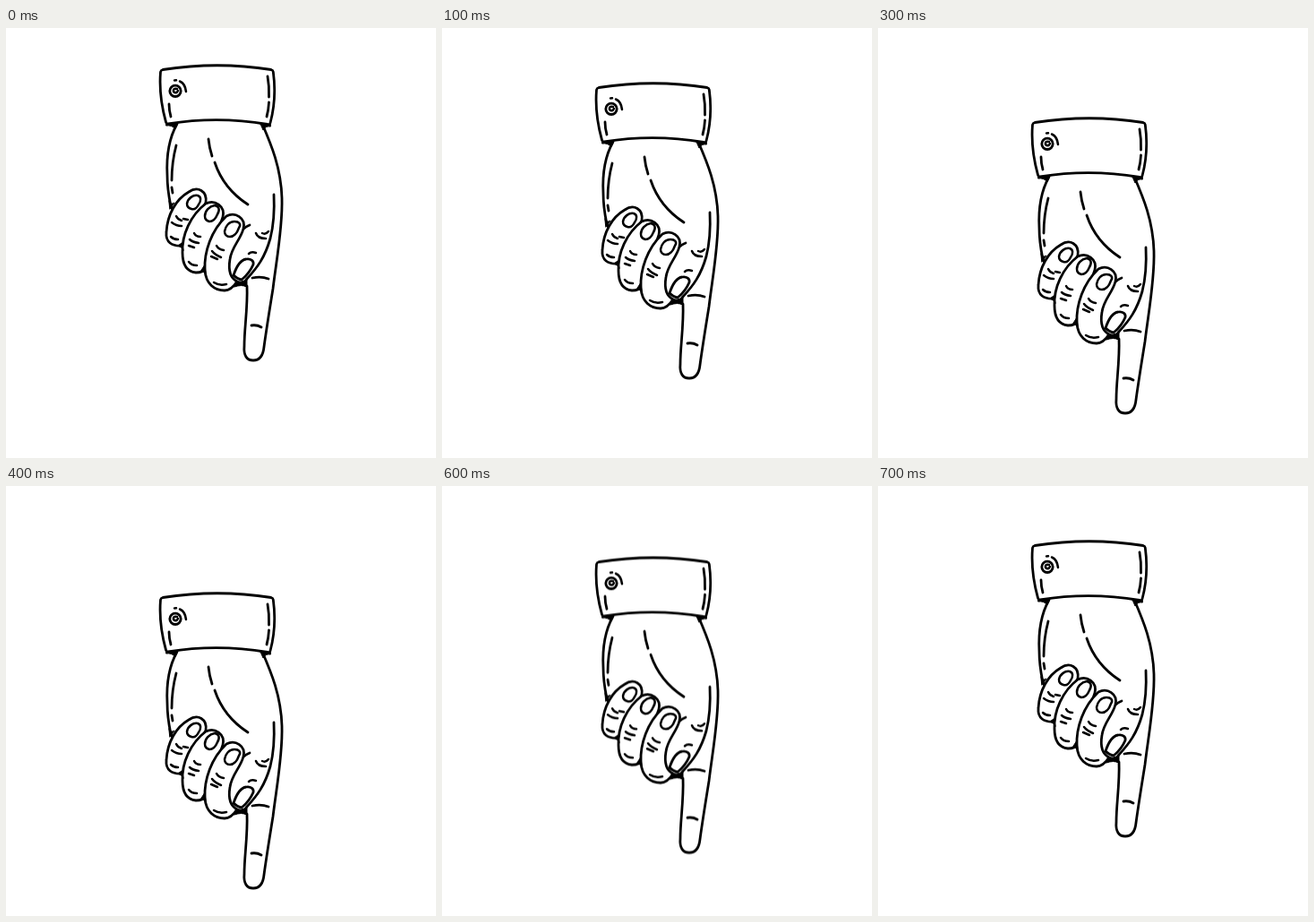
Recreate the animation shown at these times as an HTML page. Size 480 by 480 pixels, loop 0.8 s.

```html
<!DOCTYPE html>
<html lang="en">
<head>
<meta charset="utf-8">
<title>Pointing hand</title>
<style>
  html, body { margin: 0; width: 100%; height: 100%; overflow: hidden; background: #fff; }
  svg { display: block; width: 100vw; height: 100vh; }
  .hand {
    fill: none; stroke: #000; stroke-width: 2.8;
    stroke-linecap: round; stroke-linejoin: round;
    animation: bob 800ms step-end infinite;
  }
  .skin { fill: #fff; }
  .ink { fill: #000; stroke-width: 1; }
  .fine { stroke-width: 2.5; }
  @keyframes bob {
    0%, 100% { transform: translateY(0); }
    12.5%, 87.5% { transform: translateY(20px); }
    25%, 75% { transform: translateY(38.3px); }
    37.5%, 62.5% { transform: translateY(59px); }
    50% { transform: translateY(78px); }
  }
</style>
</head>
<body>
<svg viewBox="0 0 480 480">
  <g class="hand">
    <!-- palm and index finger -->
    <path class="skin" d="M191 107C182 123 179 145 180 164C180 180 182 189 184 199L222 270L269 288C270 312 266 335 266 355C265 366 269 371 276 371C283 371 287 366 288 356C291 334 295 310 298 291C302 258 309 222 308 190C307 156 296 130 286 107"/>
    <path d="M299 186C300 206 298 223 295 235C289 256 281 267 268 281"/>
    <path d="M226 124Q227 134 230 143M233 150C240 171 253 186 270 197"/>
    <path d="M190 131Q185 150 185 170M185 178L186 184"/>
    <path d="M275 279Q285 277 293 280M274 332Q280 331 285 334"/>

    <!-- thumb -->
    <path d="M259 232Q264 223 272 220"/>
    <path class="fine" d="M279 229Q281 235 290 235M286 229Q290 231 293 227M271 252Q274 249 279 251"/>
    <path class="skin" d="M254 276C257 267 261 259 268 258C273 257 277 260 276 264C273 271 268 277 263 281Q258 280 254 276Z"/>

    <!-- folded fingers -->
    <path class="skin" d="M223 195C225 182 214 176 204 183C190 191 180 208 179 228C178 239 185 244 197 243Z"/>
    <path class="skin" d="M242 211C245 199 233 191 223 196C206 209 196 231 197 251C197 265 203 272 212 273C218 273 221 272 223 268Z"/>
    <path class="skin" d="M265 224C268 212 256 205 246 210C229 226 221 250 222 270C223 286 233 293 244 293C250 293 254 289 258 283C250 279 248 270 250 258C252 244 262 236 265 224Z"/>

    <!-- nails -->
    <g class="fine">
      <path d="M202 196C203 190 209 186 214 187C218 188 218 193 215 197C213 201 210 203 207 202C203 201 202 199 202 196Z"/>
      <path d="M222 210C222 204 227 199 233 198C238 199 239 203 236 208C234 213 231 216 227 216C223 215 222 213 222 210Z"/>
      <path d="M244 227C245 221 249 216 255 216C260 216 263 219 260 223C258 229 254 233 250 233C246 233 244 230 244 227Z"/>
    </g>

    <!-- knuckle creases -->
    <g class="fine">
      <path d="M190 210Q192 214 196 215M198 213L203 214M185 217Q190 221 196 221M184 233Q187 236 192 236"/>
      <path d="M210 229Q212 233 217 233M205 236Q208 239 215 240M204 243L210 245M204 261Q207 265 213 265"/>
      <path d="M235 243Q237 247 243 248M230 249Q233 253 240 256M229 255L236 258M232 284Q238 288 246 286"/>
    </g>

    <!-- dark corners -->
    <path class="ink" d="M179 106L195 103Q190 106 189 113Q185 108 179 109ZM295 107L280 103Q285 107 287 114Q290 109 295 110Z"/>
    <path class="ink" d="M182 193Q184 198 188 195L183 202ZM196 240L192 243Q196 244 198 248ZM222 264L217 272Q221 271 223 276ZM257 282Q263 285 269 280V289Q263 286 255 289Z"/>

    <!-- cuff -->
    <path class="skin" d="M175 46.500Q236 37 296 46.500Q298 47 298.300 49C301 69 299 91 295 106Q294.500 108 292 107.500Q236 98 181 107Q179 107 178.500 105C174 89 171 68 172.500 49Q173 47 175 46.500Z"/>
    <path d="M182 85Q182 92 184 99M292 54Q294 65 293.500 77M293.500 83Q293 92 291 99"/>
    <circle cx="189" cy="70.300" r="6.200"/>
    <path class="fine" d="M191 68Q186 67 187 71Q190 74 192 70"/>
    <path class="fine" d="M188 58.500L190 58.300M194 59.500Q200 62 201 71"/>
  </g>
</svg>
</body>
</html>
```
